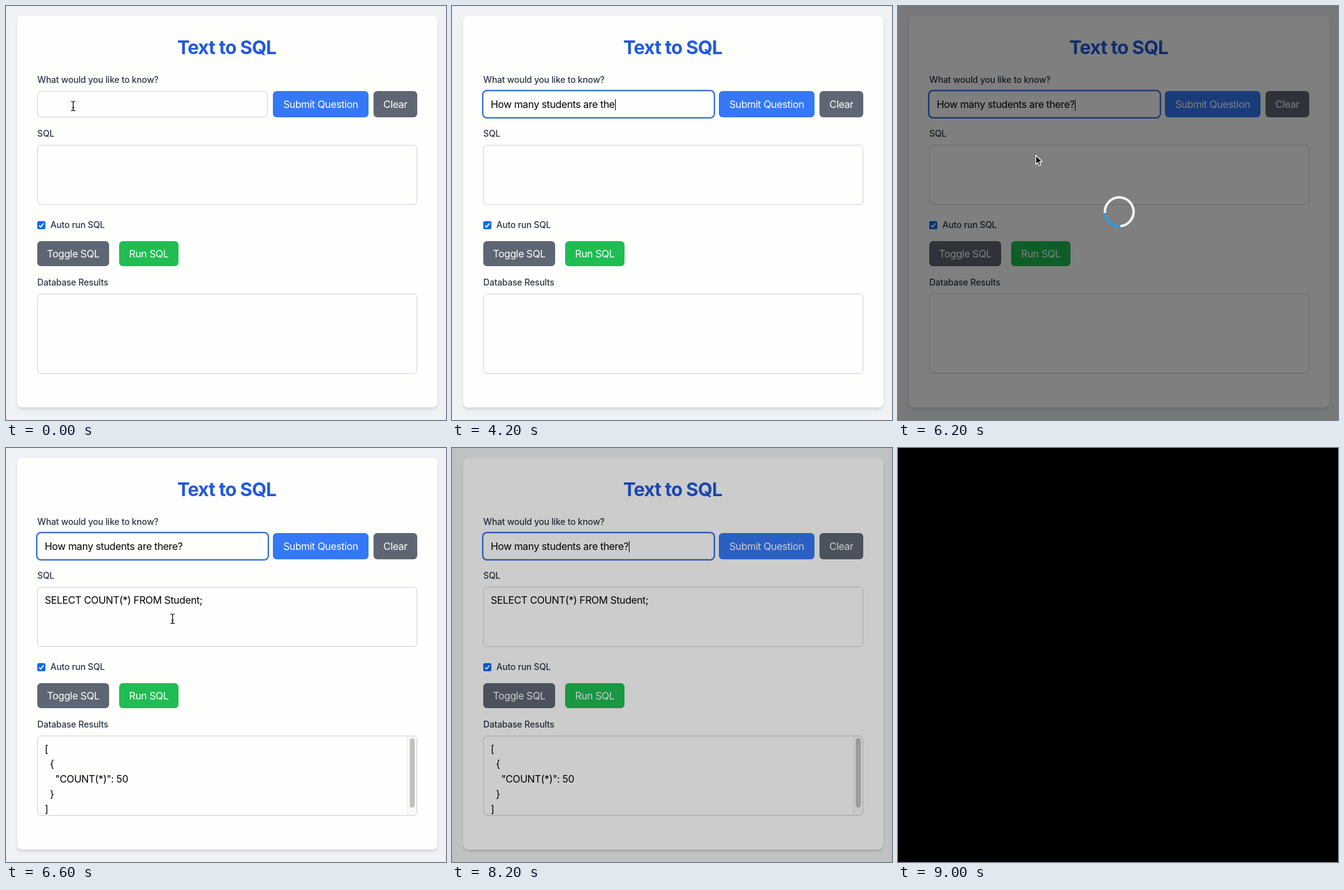
Animation, 704 px wide and 662 px high, one loop 9200 ms. Source, as an HTML page:

```html
<!DOCTYPE html>
<html lang="en">
<head>
<meta charset="utf-8">
<title>Text to SQL</title>
<style>
  html, body { margin: 0; width: 100%; height: 100%; overflow: hidden; background: #f0f1f4; }
  #stage {
    position: relative; width: 704px; height: 662px; overflow: hidden; background: #f0f1f4;
    font: 400 16px/24px Inter, sans-serif; font-optical-sizing: none;
    letter-spacing: -.34px; color: #000;
  }
  #stage * { box-sizing: border-box; }
  #stage > * { position: absolute; }
  .card {
    left: 18px; top: 16px; width: 672px; height: 626px; border-radius: 8px; background: #fefffd;
    box-shadow: 0 4px 6px -1px rgba(0,0,0,.1), 0 2px 4px -2px rgba(0,0,0,.1);
  }
  h1 {
    left: 17px; top: 48px; width: 672px; margin: 0; text-align: center;
    font-size: 30px; line-height: 36px; font-weight: 700; letter-spacing: -.8px; color: #2159df;
  }
  .label {
    left: 50px; font-size: 14px; line-height: 20px; font-weight: 500;
    letter-spacing: -.15px; color: #2e3645; white-space: pre;
  }
  .field {
    left: 50px; width: 608px; border: 1px solid #cdd0d7; border-radius: 6px;
    padding: 8px 11px; white-space: pre; overflow: hidden; background: #fefffd;
  }
  #question { top: 136px; width: 369px; height: 42px; }
  #question.focus { box-shadow: 0 0 0 2px #3971dd; }
  #caret { display: inline-block; width: 1px; height: 18px; margin-left: .5px; vertical-align: -4px; background: #000; }
  .button { display: flex; align-items: center; justify-content: center; border-radius: 6px; color: #fff; }
  .blue { background: #3478f7; }
  .gray { background: #5f6673; }
  .green { background: #1fbd53; }
  #scrollbar { left: 642px; top: 461px; width: 15px; height: 126px; background: #fafafa; border-left: 1px solid #e8e8e8; border-radius: 0 5px 5px 0; }
  #scrollbar::after { content: ""; position: absolute; left: 3px; top: 3px; width: 8px; height: 111px; border-radius: 4px; background: #c1c1c1; }
  #overlay, #fade { inset: 0; background: #000; }
  #overlay { opacity: .5; }
  #spinner { left: 329px; top: 304px; width: 50px; height: 50px; border-radius: 50%; border: 4px solid #f3f3f3; border-top-color: #3498db; }
  .pointer { left: 0; top: 0; overflow: visible; }
</style>
</head>
<body>
<div id="stage">
  <div class="card"></div>
  <h1>Text to SQL</h1>

  <div class="label" style="top:108px">What would you like to know?</div>
  <div class="field" id="question"><span id="typed"></span><span id="caret"></span></div>
  <div class="button blue" style="left:427px;top:136px;width:153px;height:42px">Submit Question</div>
  <div class="button gray" style="left:588px;top:136px;width:70px;height:42px">Clear</div>

  <div class="label" style="top:194px">SQL</div>
  <div class="field" id="sql" style="top:222px;height:96px"></div>

  <svg style="left:50px;top:344px" width="13" height="13">
    <rect width="13" height="13" rx="2.5" fill="#0b6bf2"/>
    <path d="M3 6.8 5.4 9.3 10 3.6" fill="none" stroke="#fff" stroke-width="1.8"/>
  </svg>
  <div class="label" style="left:71px;top:340px">Auto run SQL</div>
  <div class="button gray" style="left:50px;top:376px;width:115px;height:40px">Toggle SQL</div>
  <div class="button green" style="left:181px;top:376px;width:95px;height:40px">Run SQL</div>

  <div class="label" style="top:432px">Database Results</div>
  <div class="field" id="results" style="top:460px;height:128px"></div>
  <div id="scrollbar"></div>

  <div id="overlay"></div>
  <div id="spinner"></div>

  <svg class="pointer" id="beam" width="1" height="1">
    <defs>
      <path id="beamShape" d="M-3-7.5Q0-7.5 0-5.5Q0-7.5 3-7.5M0-5.5V5.5M-3 7.5Q0 7.5 0 5.5Q0 7.5 3 7.5M-1.5 2.5H1.5" fill="none" stroke-linecap="round"/>
    </defs>
    <use href="#beamShape" stroke="#fff" stroke-width="2.6"/>
    <use href="#beamShape" stroke="#000" stroke-width="1.2"/>
  </svg>
  <svg class="pointer" id="arrow" width="1" height="1">
    <path d="M0 0V14.5L3.3 11.4 5.6 16.8 8.1 15.7 5.8 10.5H10.4Z" fill="#000" stroke="#fff" stroke-width="1.2" stroke-linejoin="round"/>
  </svg>
  <div id="fade"></div>
</div>
<script>
  const LOOP = 9200, STEP = 200;
  const QUESTION = "How many students are there?";
  const SQL = "SELECT COUNT(*) FROM Student;";
  const RESULTS = JSON.stringify([{ "COUNT(*)": 50 }], null, 2);
  const LOAD_START = 4600, STALL_END = 5200, LOAD_END = 6400, FADE_START = 8000;

  // [time, characters typed]
  const TYPING = [[800, 1], [1200, 3], [1600, 5], [2000, 7], [2200, 9], [2600, 11], [2800, 12],
    [3000, 14], [3200, 16], [3400, 18], [3800, 19], [4000, 22], [4200, 25], [4400, 28]];
  // [time, x, y]
  const MOUSE = [[0, 107, 160], [STALL_END, 107, 160], [6600, 266, 273], [7200, 300, 480], [7800, 330, 690]];

  const $ = id => document.getElementById(id);
  const show = (id, on) => { $(id).style.visibility = on ? "visible" : "hidden"; };

  function mouseAt(t) {
    const i = MOUSE.findIndex(p => p[0] > t);
    if (i < 0) return MOUSE[MOUSE.length - 1].slice(1);
    const [t0, x0, y0] = MOUSE[i - 1], [t1, x1, y1] = MOUSE[i];
    const k = (t - t0) / (t1 - t0);
    return [x0 + (x1 - x0) * k, y0 + (y1 - y0) * k];
  }

  function render(time) {
    const t = Math.floor(time % LOOP / STEP) * STEP;
    const loading = t >= LOAD_START && t < LOAD_END;
    const done = t >= LOAD_END;
    const typed = TYPING.filter(p => p[0] <= t).pop();

    $("typed").textContent = QUESTION.slice(0, typed ? typed[1] : 0);
    $("question").classList.toggle("focus", t >= 200);
    const blinkedOff = t > 5000 && t < FADE_START && Math.floor((t - 5000) / 500) % 2;
    show("caret", t >= 200 && !blinkedOff);

    $("sql").textContent = done ? SQL : "";
    $("results").textContent = done ? RESULTS : "";
    show("scrollbar", done);

    show("overlay", loading);
    show("spinner", loading);
    // The page stalls briefly before the spinner turns, once per second.
    const spun = t < STALL_END ? 0 : t - LOAD_START;
    $("spinner").style.transform = `rotate(${4 + spun * .36}deg)`;

    const [x, y] = mouseAt(t);
    $("beam").style.transform = `translate(${x + .5}px, ${y}px)`;
    $("arrow").style.transform = `translate(${x}px, ${y - 2}px)`;
    show("beam", t < 800 || done);
    show("arrow", loading);

    $("fade").style.opacity = Math.min(1, Math.max(0, (t - FADE_START) / 1000));
  }

  const start = performance.now();
  (function tick() {
    render(performance.now() - start);
    requestAnimationFrame(tick);
  })();
</script>
</body>
</html>
```
